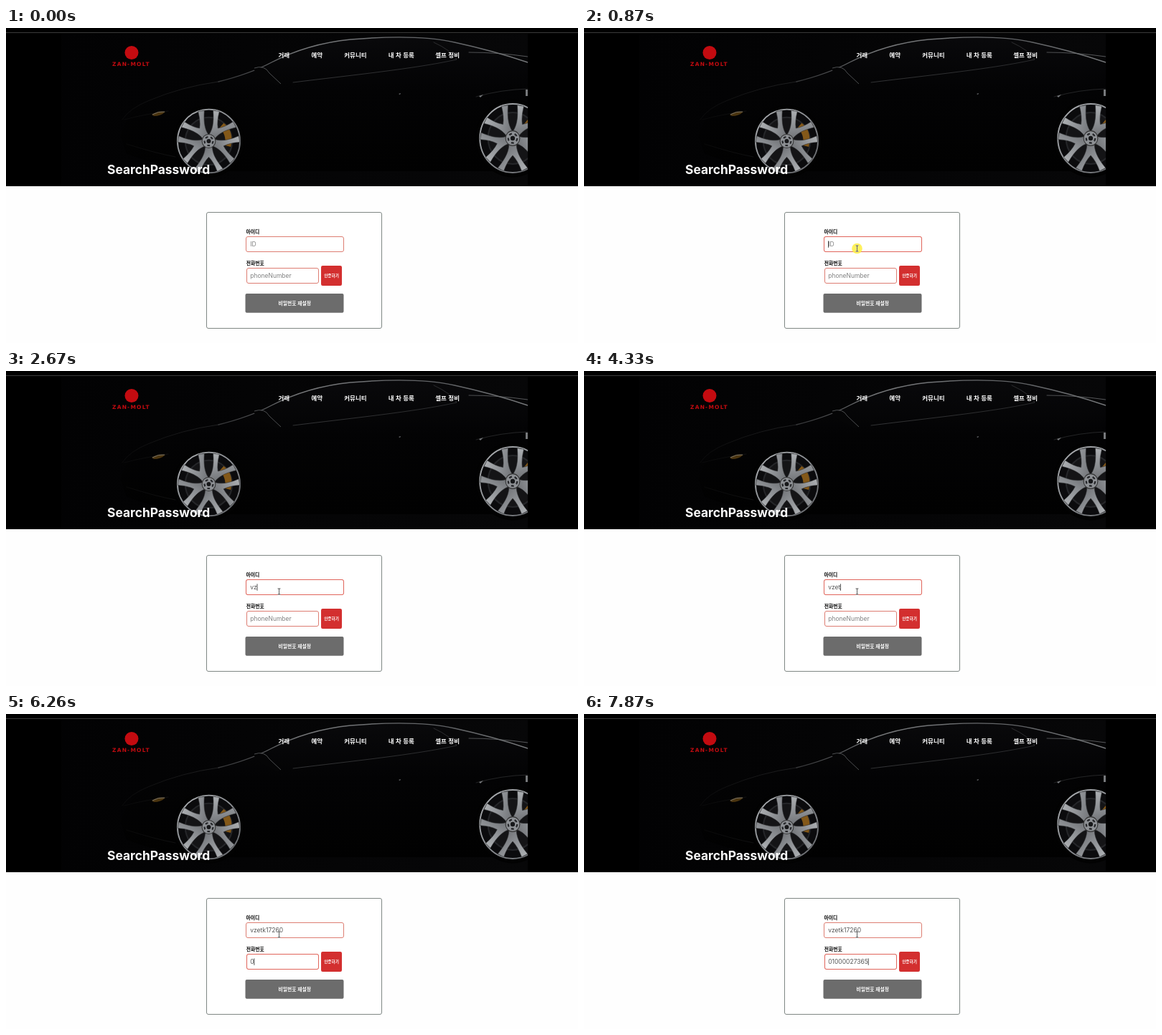
An HTML page that plays this animation: 797 by 440 pixels, repeating every 8 s.

```html
<!DOCTYPE html>
<html lang="ko">
<head>
<meta charset="utf-8">
<title>Search password</title>
<style>
html, body { margin: 0; width: 100%; height: 100%; overflow: hidden; background: #fefefe; }
svg { display: block; width: 797px; height: 440px; font-family: Inter, "Noto Sans CJK KR", "Noto Sans CJK", sans-serif; }
.ko { font-family: "Noto Sans CJK KR", "Noto Sans CJK", sans-serif; font-weight: 700; }
.heavy { font-weight: 900; }
.field rect { fill: #fff; stroke: #dd7d72; }
.field text { font-size: 8.5px; fill: #555; }
.field.blank text { fill: #808080; }
.field.focus rect { stroke: #e0655b; filter: drop-shadow(0 0 .7px #e8897f); }
.caret { fill: #222; }
</style>
</head>
<body>
<svg viewBox="0 0 797 440">
  <defs>
    <clipPath id="photo"><rect x="77" y="8" width="650" height="213"/></clipPath>
    <linearGradient id="back" x2="1">
      <stop offset="0" stop-color="#020203"/><stop offset="1" stop-color="#070708"/>
    </linearGradient>
    <linearGradient id="body" x2="0" y2="1">
      <stop offset="0" stop-color="#09090b"/><stop offset=".4" stop-color="#030304"/><stop offset="1" stop-color="#010101"/>
    </linearGradient>
    <linearGradient id="rim" x2="1" y2="1">
      <stop offset="0" stop-color="#b0b3b6"/><stop offset=".5" stop-color="#8b8e92"/><stop offset="1" stop-color="#606266"/>
    </linearGradient>
    <linearGradient id="edge" x1="160" x2="727" gradientUnits="userSpaceOnUse">
      <stop offset="0" stop-color="#111"/><stop offset=".25" stop-color="#37383a"/><stop offset=".45" stop-color="#77797b"/><stop offset=".8" stop-color="#606265"/><stop offset="1" stop-color="#77797b"/>
    </linearGradient>
    <path id="spoke" d="M-5 -7 C-5 -15 -8 -24 -20 -38 L-12 -42 Q-7 -29 0 -22 Q7 -29 12 -42 L20 -38 C8 -24 5 -15 5 -7 Z"/>
    <g id="wheel">
      <circle r="50" fill="#020202"/>
      <circle r="44" fill="#0b0b0d" stroke="url(#rim)" stroke-width="1.8"/>
      <circle r="33" fill="#141416" stroke="#252629" stroke-width="2"/>
      <path d="M21 -25 Q36 -14 31 8 L23 6 Q25 -10 15 -18 Z" fill="#835819"/>
      <g id="spokes" fill="url(#rim)" stroke="#2a2b2d" stroke-width=".5"></g>
      <circle r="9.5" fill="#8d9094" stroke="#333" stroke-width="1"/>
      <circle r="6" fill="none" stroke="#26272a" stroke-width="2.2" stroke-dasharray="3.8 3.74"/>
      <circle r="3" fill="#17181a"/>
    </g>
  </defs>

  <rect width="797" height="221"/>
  <g clip-path="url(#photo)">
    <rect x="77" y="8" width="650" height="213" fill="url(#back)"/>
    <path d="M160 152 Q162 130 188 108 C220 88 260 79 296 75 Q340 64 370 48 C405 30 440 20 480 16 C540 11 590 12 625 20 Q680 32 727 48 V200 H240 L168 176 Z" fill="url(#body)"/>
    <g fill="none" stroke="url(#edge)" stroke-linecap="round">
      <path d="M296 75 Q340 64 370 48 C405 30 440 20 480 16 C540 11 590 12 625 20 Q680 32 727 48" stroke-width="1.4"/>
      <path d="M162 128 Q172 112 200 101 Q245 82 296 75" stroke-width=".8" opacity=".7"/>
      <path d="M400 76 C480 66 570 57 628 44 Q620 31 596 20" stroke-width=".8" opacity=".5"/>
      <path d="M645 34 Q685 34 727 40" stroke-width=".9" opacity=".8"/>
      <path d="M165 128 Q190 121 226 116 M168 162 Q205 174 236 180" stroke-width=".7" opacity=".6"/>
      <path d="M655 96 Q690 86 727 85" stroke-width=".6" opacity=".5"/>
    </g>
    <path d="M345 57 Q362 51 368 64 L384 78 L378 81 L362 72 Q350 68 345 57Z" fill="#050506"/>
    <path d="M346 56 Q360 51 367 63 L383 78" fill="none" stroke="#55575a" stroke-width=".9"/>
    <path d="M203 121 Q212 115 222 117 Q216 123 206 123Z" fill="#4b3510"/>
    <path d="M204 121 Q212 116 221 117" fill="none" stroke="#85807a" stroke-width=".8"/>
    <path d="M724 86 h3 v9 h-3z M547 92 l3 -1 -1 2z M659 95 l6 -2 -4 4z" fill="#77797c"/>
    <use href="#wheel" transform="translate(282.5 158) scale(.99 1.01)"/>
    <use href="#wheel" transform="translate(706 154) scale(1.04 1.09)"/>
  </g>
  <rect y="6" width="797" height="1" fill="#3a3a3a"/>

  <circle cx="175" cy="34.5" r="9.5" fill="#c30b10"/>
  <text x="148" y="53" font-family="DejaVu Sans, sans-serif" font-weight="700" font-size="7.5" letter-spacing="1.2" fill="#c30b10">ZAN-MOLT</text>
  <g class="ko" font-size="8.5" fill="#fff">
    <text x="379.5" y="41.3">거래</text>
    <text x="425.5" y="41.3">예약</text>
    <text x="471.3" y="41.3">커뮤니티</text>
    <text x="532.8" y="41.3">내 차 등록</text>
    <text x="598.3" y="41.3">셀프 정비</text>
  </g>
  <text x="141" y="204" font-weight="700" font-size="17.4" fill="#fff">SearchPassword</text>

  <rect x="279.5" y="257.5" width="244" height="162" rx="2.5" fill="#fff" stroke="#7f8784"/>
  <g class="ko heavy" font-size="6.8">
    <text x="334.5" y="286.5">아이디</text>
    <text x="334.8" y="330.5">전화번호</text>
  </g>
  <g class="field" id="user">
    <rect x="334.5" y="291.5" width="136" height="21" rx="2.5"/>
    <text x="340.2" y="305.3"></text>
  </g>
  <g class="field" id="phone">
    <rect x="335.5" y="335.5" width="100" height="21" rx="2.5"/>
    <text x="340.2" y="349.3"></text>
  </g>
  <rect class="caret" id="caret" width=".8" height="9.4"/>
  <rect x="439" y="332" width="29" height="28" rx="2.2" fill="#d32f2f"/>
  <text class="ko heavy" x="453.5" y="348" text-anchor="middle" font-size="5.6" fill="#fff">인증하기</text>
  <rect x="333.5" y="371" width="137" height="26.7" rx="2" fill="#6c6c6c"/>
  <text class="ko heavy" x="402.3" y="387" text-anchor="middle" font-size="6.75" fill="#fff">비밀번호 재설정</text>

  <g id="pointer">
    <circle id="halo" r="7.3" fill="#fff04a"/>
    <g fill="none">
      <path d="M-2 -4 H2 M0 -4 V4 M-2 4 H2" stroke="#fff" stroke-width="1.8" opacity=".7"/>
      <path d="M-2 -4 H2 M0 -4 V4 M-2 4 H2" stroke="#333" stroke-width=".8"/>
    </g>
  </g>
</svg>
<script>
const LOOP = 8000, BLINK = 530, USER_FOCUS = 800, PHONE_FOCUS = 5730;
const $ = id => document.getElementById(id);

$('spokes').innerHTML = [0, 1, 2, 3, 4]
  .map(i => `<use href="#spoke" transform="rotate(${i * 72 + 36})"/>`).join('');

// Each key is [time, number of characters present from then on].
const fields = {
  user: { hint: 'ID', value: 'vzetk17260', keys: [[2600, 1], [2670, 2], [3130, 1], [3200, 0], [4000, 1],
    [4130, 2], [4330, 4], [4460, 5], [4660, 6], [4730, 8], [5000, 9], [5200, 10]] },
  phone: { hint: 'phoneNumber', value: '01000027365', keys: [[6260, 1], [6400, 2], [6540, 3], [7070, 4],
    [7130, 5], [7200, 6], [7400, 7], [7600, 8], [7730, 10], [7870, 11]] }
};
const path = [[70, 357, 360], [140, 347, 328], [280, 347, 328], [560, 371, 310], [720, 380.5, 308]];

function pointerAt(t) {
  const i = path.findIndex(p => p[0] > t);
  if (i < 0) return path[path.length - 1].slice(1);
  if (i === 0) return path[0].slice(1);
  const [t0, x0, y0] = path[i - 1], [t1, x1, y1] = path[i];
  const k = (t - t0) / (t1 - t0);
  return [x0 + (x1 - x0) * k, y0 + (y1 - y0) * k];
}

function drawField(id, t, focused) {
  const { hint, value, keys } = fields[id];
  const last = keys.filter(k => k[0] <= t).pop() || [0, 0];
  const box = $(id), label = box.querySelector('text');
  const typed = value.slice(0, last[1]);
  label.textContent = typed || hint;
  box.classList.toggle('blank', !typed);
  box.classList.toggle('focus', focused);
  return { edited: last[0], y: +label.getAttribute('y'), width: typed ? label.getComputedTextLength() : 0 };
}

function draw(t) {
  const onPhone = t >= PHONE_FOCUS, onUser = t >= USER_FOCUS && !onPhone;
  const user = drawField('user', t, onUser), phone = drawField('phone', t, onPhone);
  const active = onPhone ? phone : user;
  // The blink restarts with each keystroke.
  const since = Math.max(active.edited, onPhone ? PHONE_FOCUS : 870);
  const lit = t < since || Math.floor((t - since) / BLINK) % 2 === 0;
  $('caret').setAttribute('x', 340.1 + active.width);
  $('caret').setAttribute('y', active.y - 7.9);
  $('caret').style.display = (onUser || onPhone) && lit ? '' : 'none';

  $('pointer').style.display = t < 70 ? 'none' : '';
  $('pointer').setAttribute('transform', `translate(${pointerAt(t)})`);
  $('halo').style.display = t >= 740 && t < 1000 ? '' : 'none';
  $('halo').style.opacity = Math.min(.9, (1000 - t) / 120);
}

function tick() {
  draw(performance.now() % LOOP);
  requestAnimationFrame(tick);
}
tick();
</script>
</body>
</html>
```
